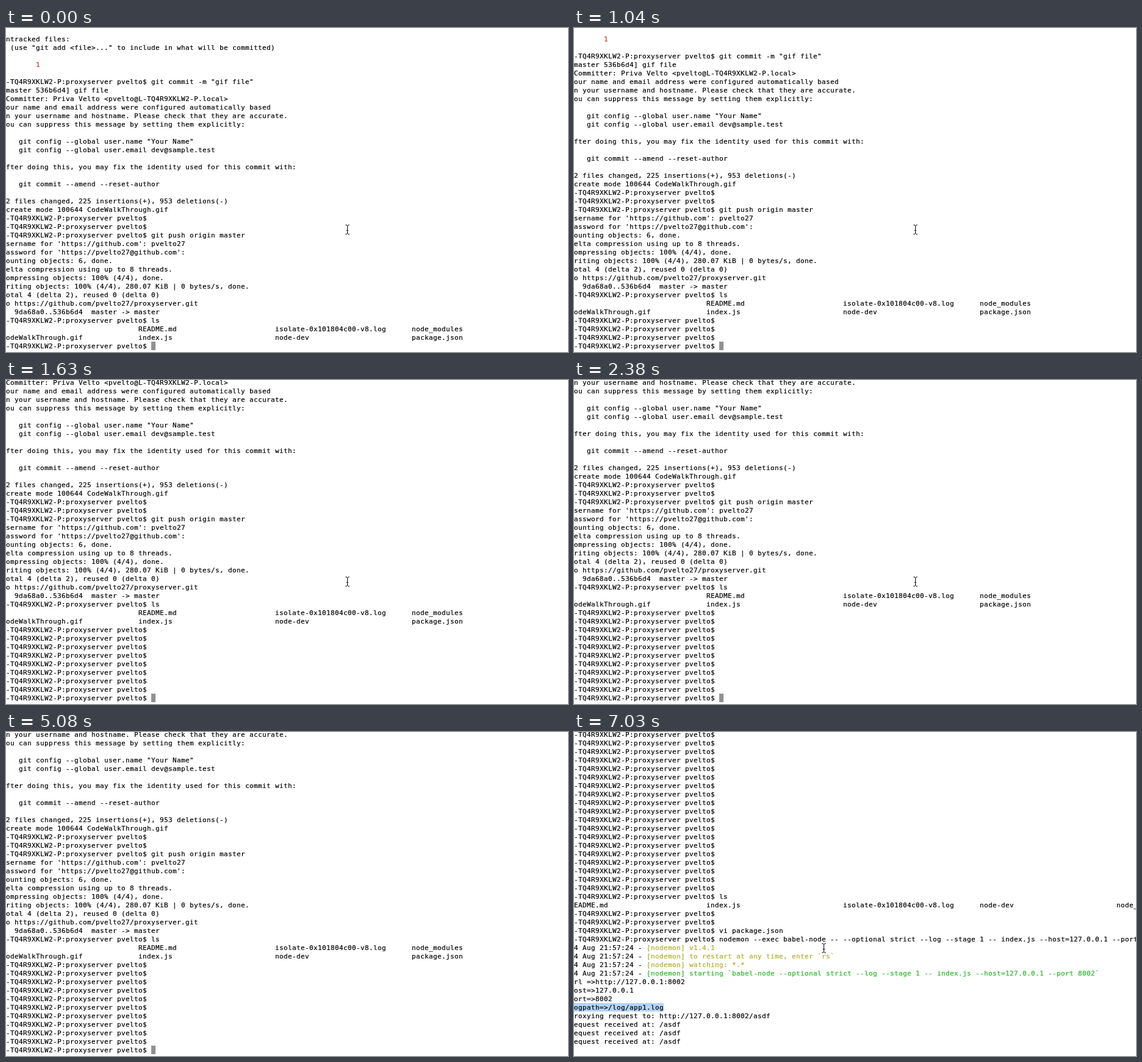
Recreate the animation shown at these times as an HTML page. Size 921 by 532 pixels, loop 8000 ms.

```html
<!DOCTYPE html>
<html lang="en">
<head>
<meta charset="utf-8">
<title>Terminal session</title>
<style>
  html, body { margin: 0; width: 100%; height: 100%; overflow: hidden; background: #fff; }
  #stage { position: relative; width: 921px; height: 532px; overflow: hidden; background: #fff; }
  .view { position: absolute; inset: 0 0 3px; overflow: hidden; background: #fff; }
  .rows {
    position: absolute; top: -3px; left: 0;
    font: 11px/15px "DejaVu Sans Mono", monospace;
    letter-spacing: calc(7px - 1ch);
    font-variant-ligatures: none;
    -webkit-text-stroke: .2px;
    white-space: pre; color: #000;
  }
  .rows div { height: 14px; width: max-content; }
  .r { color: #c33720; }
  .y { color: #adad27; }
  .g { color: #25b424; }
  .rows .selected { background: #b4d5fe; }
  #caret { position: absolute; left: 238px; top: 515px; width: 7px; height: 14px; background: #919191; }
  #pointer { position: absolute; left: 0; top: 0; width: 7px; height: 16px; }
</style>
</head>
<body>
<div id="stage">
  <div class="view"><div class="rows" id="push"></div><div id="caret"></div></div>
  <div class="view" id="server"><div class="rows" id="serve"></div></div>
  <svg id="pointer" viewBox="0 0 7 16">
    <path d="M.3 .5H2L3.5 1.8 5 .5H6.7M.3 15.5H2L3.5 14.2 5 15.5H6.7M3.5 1.5V14.5M2 9.5H5" fill="none" stroke="#000"/>
  </svg>
</div>
<script>
const LOOP = 8000, ROW = 14;
const byId = id => document.getElementById(id);

const host = '-TQ4R9XKLW2-P', user = 'pvelto', account = 'pvelto27';
const prompt = `${host}:proxyserver ${user}$`;
const prompts = count => Array(count).fill(prompt).join('\n');

// Places listing entries on 32-character tab stops; the first character is cut off.
const listing = (first, ...rest) => first.padEnd(31) + rest.map(name => name.padEnd(32)).join('');

const pushLog = `
ntracked files:
 (use "git add <file>..." to include in what will be committed)

       {r}1

${prompt} git commit -m "gif file"
master 536b6d4] gif file
Committer: Priva Velto <${user}@L${host}.local>
our name and email address were configured automatically based
n your username and hostname. Please check that they are accurate.
ou can suppress this message by setting them explicitly:

   git config --global user.name "Your Name"
   git config --global user.email dev@sample.test

fter doing this, you may fix the identity used for this commit with:

   git commit --amend --reset-author

2 files changed, 225 insertions(+), 953 deletions(-)
create mode 100644 CodeWalkThrough.gif
${prompts(2)}
${prompt} git push origin master
sername for 'https://github.com': ${account}
assword for 'https://${account}@github.com':
ounting objects: 6, done.
elta compression using up to 8 threads.
ompressing objects: 100% (4/4), done.
riting objects: 100% (4/4), 280.07 KiB | 0 bytes/s, done.
otal 4 (delta 2), reused 0 (delta 0)
o https://github.com/${account}/proxyserver.git
  9da68a0..536b6d4  master -> master
${prompt} ls
${listing('', 'README.md', 'isolate-0x101804c00-v8.log', 'node_modules')}
${listing('odeWalkThrough.gif', 'index.js', 'node-dev', 'package.json')}
${prompts(11)}`;

const stamp = '4 Aug 21:57:24 - ';
const serverLog = `${prompts(19)}
${prompt} ls
${listing('EADME.md', 'index.js', 'isolate-0x101804c00-v8.log', 'node-dev', 'node_modules')}
${prompts(2)}
${prompt} vi package.json
${prompt} nodemon --exec babel-node -- --optional strict --log --stage 1 -- index.js --host=127.0.0.1 --port 8002
${stamp}{y}[nodemon] v1.4.1
${stamp}{y}[nodemon] to restart at any time, enter \`rs\`
${stamp}{y}[nodemon] watching: *.*
${stamp}{g}[nodemon] starting \`babel-node --optional strict --log --stage 1 -- index.js --host=127.0.0.1 --port 8002\`
rl =>http://127.0.0.1:8002
ost=>127.0.0.1
ort=>8002
ogpath=>/log/app1.log
roxying request to: http://127.0.0.1:8002/asdf
equest received at: /asdf
equest received at: /asdf
equest received at: /asdf`;

// A {r}, {y} or {g} tag colours the rest of its line.
function fill(box, log) {
  for (const line of log.split('\n')) {
    const row = document.createElement('div');
    const [plain, color, tinted] = line.split(/\{([ryg])\}/);
    row.append(plain);
    if (color) {
      const span = document.createElement('span');
      span.className = color;
      span.textContent = tinted;
      row.append(span);
    }
    if (line.startsWith('ogpath')) row.className = 'selected';
    box.append(row);
  }
}

// Plays a table of [time, value] as hard changes.
function play(el, prop, table, format = String) {
  const frames = table.map(([time, value]) =>
    ({ offset: time / LOOP, [prop]: format(value), easing: 'step-end' }));
  frames.push({ ...frames[frames.length - 1], offset: 1 });
  el.animate(frames, { duration: LOOP, iterations: Infinity });
}

fill(byId('push'), pushLog);
fill(byId('serve'), serverLog);

play(byId('push'), 'transform', [
  [0, 0], [600, 1], [890, 2], [1040, 3], [1190, 5], [1340, 6],
  [1480, 7], [1630, 8], [1930, 9], [2380, 10]
], lines => `translateY(${-lines * ROW}px)`);

play(byId('server'), 'opacity', [[0, 0], [6130, 1]]);

play(byId('pointer'), 'transform', [
  [0, [556, 323]], [4630, [463, 214]], [4780, [458, 199]], [4930, [391, 142]],
  [6580, [398, 199]], [6730, [399, 200]], [6880, [399, 335]], [7030, [406, 347]]
], ([x, y]) => `translate(${x}px, ${y}px)`);

play(byId('pointer'), 'opacity', [[0, 1], [5080, 0], [6580, 1]]);
</script>
</body>
</html>
```
